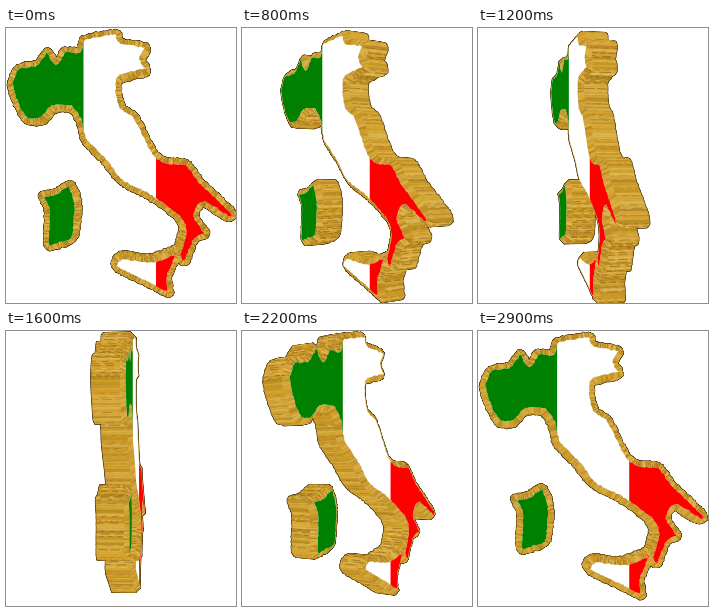
Recreate the animation shown at these times as an HTML page with a canvas. Size 230 by 275 pixels, loop 3000 ms.

```html
<!DOCTYPE html>
<html lang="en">
<head>
<meta charset="utf-8">
<style>
  html, body { margin: 0; height: 100%; overflow: hidden; background: #fff; }
  canvas { display: block; }
</style>
</head>
<body>
<canvas id="stage" width="230" height="275"></canvas>
<script>
const ctx = document.getElementById('stage').getContext('2d');
const WIDTH = 230, HEIGHT = 275, CX = 115.5, CY = 137;
const HALF = 15, BEVEL = 5, RIM = 2.6, CAMERA = 850;
const STEPS = 30, STEP_MS = 100;

// Key points of each coast as x, y pairs, land on the left hand
const mainland = [
  20,92, 35,92, 47,80, 64,80, 73,93, 78,112, 98,133, 115,154, 142,168, 171,189,
  178,203, 172,228, 180,235, 190,212, 201,206, 190,188, 198,176, 223,191, 227,184,
  196,154, 181,135, 161,133, 148,124, 130,89, 116,78, 113,51, 141,42, 136,31,
  141,18, 115,13, 110,4, 78,10, 73,22, 58,22, 50,34, 41,22, 30,35, 12,39, 4,55, 10,76
];
const sicily = [112,242, 145,258, 164,267, 163,250, 172,224, 146,232, 117,229, 109,235];
const sardinia = [35,168, 41,182, 41,218, 54,217, 68,210, 71,175, 63,156, 48,165];

const hash = n => { const v = Math.sin(n * 127.1) * 43758.5453; return v - Math.floor(v); };
const spread = (seed, size) => (hash(seed) - .5) * size;

// Cardinal spline through the key points, sampled about every two pixels
function smooth(flat) {
  const count = flat.length / 2, out = [];
  const key = i => { const k = (i + count) % count; return [flat[2 * k], flat[2 * k + 1]]; };
  for (let i = 0; i < count; i++) {
    const [a, b, c, d] = [key(i - 1), key(i), key(i + 1), key(i + 2)];
    const parts = Math.ceil(Math.hypot(c[0] - b[0], c[1] - b[1]) / 2);
    for (let k = 0; k < parts; k++) {
      const t = k / parts, t2 = t * t, t3 = t2 * t;
      out.push([0, 1].map(n =>
        b[n] + (c[n] - b[n]) * (3 * t2 - 2 * t3) +
        .35 * ((c[n] - a[n]) * (t3 - 2 * t2 + t) + (d[n] - b[n]) * (t3 - t2))));
    }
  }
  return out;
}

// Shift a closed outline outwards, with a slightly rough edge
function offset(points, distance) {
  const count = points.length;
  return points.map(([x, y], i) => {
    const [ax, ay] = points[(i + count - 2) % count], [bx, by] = points[(i + 2) % count];
    const length = Math.hypot(bx - ax, by - ay) || 1;
    const reach = (distance + spread(i + distance, 1.3)) / length;
    return [x - (by - ay) * reach, y + (bx - ax) * reach];
  });
}

// Each solid is three rings: face edge, lower rim of the bevel, back edge
const solids = [mainland, sicily, sardinia].map(flat => {
  const coast = smooth(flat), outer = offset(coast, RIM);
  return [
    { points: offset(coast, -RIM), depth: HALF },
    { points: outer, depth: HALF - BEVEL },
    { points: outer, depth: -HALF }
  ];
});

function projector(angle) {
  const c = Math.cos(angle), s = Math.sin(angle);
  return (x, y, w) => {
    const dx = x - CX, z = dx * s + w * c;
    const scale = CAMERA / (CAMERA + HALF - z);
    return { x: CX + (dx * c - w * s) * scale, y: CY + (y - CY) * scale, z };
  };
}

function polygon(points) {
  const path = new Path2D();
  points.forEach(p => path.lineTo(p.x, p.y));
  path.closePath();
  return path;
}

function buildQuads(rings) {
  const quads = [], count = rings[0].length;
  for (let r = 0; r < 2; r++) {
    for (let i = 0; i < count; i++) {
      const j = (i + 1) % count;
      const corners = [rings[r][i], rings[r][j], rings[r + 1][j], rings[r + 1][i]];
      const seed = i + r * .37;
      quads.push({
        corners, seed,
        path: polygon(corners),
        z: corners.reduce((sum, p) => sum + p.z, 0),
        color: `hsl(${42 + spread(seed + .3, 4)}, 66%, ${51 + spread(seed, 16)}%)`
      });
    }
  }
  return quads;
}

function drawGold(solidRings) {
  const quads = solidRings.flatMap(buildQuads).sort((a, b) => a.z - b.z);
  ctx.strokeStyle = '#3a2807';
  ctx.lineWidth = 2;
  quads.forEach(q => ctx.stroke(q.path));
  for (const { path, color, corners: [a, , , d], seed } of quads) {
    ctx.fillStyle = ctx.strokeStyle = color;
    ctx.lineWidth = .8;
    ctx.stroke(path);
    ctx.fill(path);
    // Broken grain line across the wall
    ctx.strokeStyle = hash(seed + .9) < .7 ? '#92691c' : '#ecc75e';
    ctx.lineWidth = .7;
    ctx.setLineDash([3 + hash(seed) * 9, 2 + hash(seed + .5) * 5]);
    ctx.lineDashOffset = hash(seed + .2) * 12;
    ctx.beginPath();
    ctx.moveTo(a.x, a.y);
    ctx.quadraticCurveTo((a.x + d.x) / 2, (a.y + d.y) / 2 + spread(seed + .6, 3), d.x, d.y);
    ctx.stroke();
    ctx.setLineDash([]);
  }
}

function drawFlag(solidRings, project) {
  const face = new Path2D();
  solidRings.forEach(rings => face.addPath(polygon(rings[0])));
  const left = project(77.5, CY, HALF).x, right = project(150, CY, HALF).x;
  const band = (color, from, to) => {
    ctx.fillStyle = color;
    ctx.fillRect(from, 0, to - from, HEIGHT);
  };
  ctx.save();
  ctx.clip(face);
  band('#fff', 0, WIDTH);
  band('#008000', 0, left);
  band('#f00', right, WIDTH);
  ctx.restore();
}

function draw(step) {
  const degrees = step * 180 / STEPS;
  const project = projector((degrees > 90 ? degrees - 180 : degrees) * Math.PI / 180);
  const solidRings = solids.map(rings => rings.map(({ points, depth }) =>
    points.map(([x, y]) => project(x, y, depth))));
  ctx.fillStyle = '#fff';
  ctx.fillRect(0, 0, WIDTH, HEIGHT);
  ctx.lineJoin = 'round';
  drawGold(solidRings);
  drawFlag(solidRings, project);
}

let shown = -1;
function tick() {
  const step = Math.floor(performance.now() / STEP_MS) % STEPS;
  if (step !== shown) draw(shown = step);
  requestAnimationFrame(tick);
}
tick();
</script>
</body>
</html>
```
